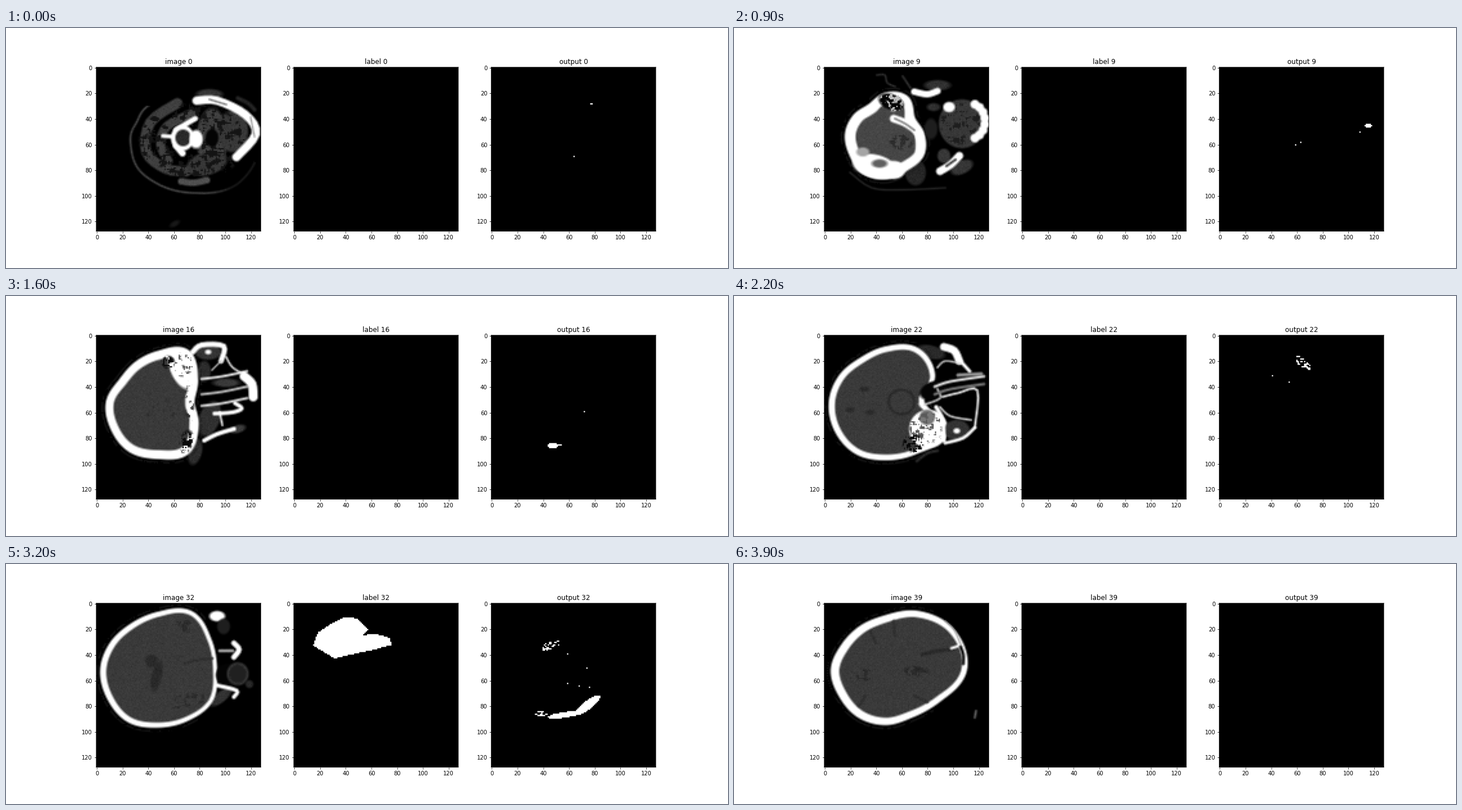
A matplotlib script that plays this animation: 1280x427 px, repeating every 4 s.

```python
import numpy as np
import matplotlib.pyplot as plt
from matplotlib.animation import FuncAnimation
from matplotlib.path import Path

SIZE, FRAMES, ZOOM = 128, 40, 4
BONE, BRAIN, SOFT, DARK, AIR = 255, 58, 64, 42, 4
X, Y = np.meshgrid(np.arange(SIZE) + 0.5, np.arange(SIZE) + 0.5)
CX, CY = 48, 52
RHO, ANGLE = np.hypot(X - CX, Y - CY), np.arctan2(Y - CY, X - CX)


def catmull(a, b, c, d, t):
    return (b + t * (c - a) / 2 + t**2 * (a - 2.5 * b + 2 * c - d / 2)
            + t**3 * (1.5 * (b - c) + (d - a) / 2))


def radius(radii, angle):
    """Smooth closed outline through radii at equal angles, clockwise from right."""
    r = np.asarray(radii, float)
    pos = angle / (2 * np.pi) * len(r)
    i = np.floor(pos).astype(int)
    return catmull(*(r[(i + k) % len(r)] for k in (-1, 0, 1, 2)), pos - i)


def outline(radii):
    """Signed distance to the outline, negative inside."""
    r = radius(radii, ANGLE)
    slope = (radius(radii, ANGLE + 0.02) - radius(radii, ANGLE - 0.02)) / 0.04
    return (RHO - r) / np.hypot(1, slope / r)


def ellipse(x, y, rx, ry, tilt=0):
    a = np.radians(tilt)
    u = (X - x) * np.cos(a) + (Y - y) * np.sin(a)
    v = (Y - y) * np.cos(a) - (X - x) * np.sin(a)
    return (np.hypot(u / rx, v / ry) - 1) * min(rx, ry)


def stroke(pts):
    """Distance to an open curve through flat x, y values."""
    p = np.reshape(pts, (-1, 2)).astype(float)
    q = np.vstack([p[:1], p, p[-1:]])
    t = np.linspace(0, 1, 5)[:, None]
    curve = np.vstack([catmull(*part, t) for part in zip(q, q[1:], q[2:], q[3:])])
    best = np.full((SIZE, SIZE), 1e9)
    for (ax, ay), (bx, by) in zip(curve, curve[1:]):
        dx, dy = bx - ax, by - ay
        s = np.clip(((X - ax) * dx + (Y - ay) * dy) / (dx * dx + dy * dy + 1e-9), 0, 1)
        best = np.minimum(best, np.hypot(X - ax - s * dx, Y - ay - s * dy))
    return best


def cover(d, soft=1.8):
    return np.clip(0.5 - d / soft, 0, 1)


def clumps(rng, w, h):
    """Blurred noise, ranked so that its values spread evenly over 0..1."""
    noise = rng.random((SIZE, SIZE))
    noise = sum(np.roll(noise, (j, i), (0, 1)) for i in range(w) for j in range(h))
    return noise.ravel().argsort().argsort().reshape(SIZE, SIZE) / SIZE**2


class Scan:
    def __init__(self, radii):
        self.img = np.zeros((SIZE, SIZE))
        self.rng = np.random.default_rng(int(radii[0]))
        self.radii = np.array(radii, float)
        self.edge = outline(radii)

    def paint(self, gray, alpha):
        self.img += (gray - self.img) * alpha

    def spot(self, gray, *shape):
        self.paint(gray, cover(ellipse(*shape)))

    def line(self, gray, width, *pts):
        self.paint(gray, cover(stroke(pts) - width / 2))

    def mottle(self, gray, share, size, *shape):
        patches = np.clip((share - clumps(self.rng, size, size)) * 4, 0, 1)
        self.paint(gray, cover(ellipse(*shape)) * patches)

    def skull(self, left, right, gray=BRAIN):
        halo = cover(abs(self.edge - 2.5) - 0.4) * (clumps(self.rng, 3, 3) < 0.6)
        self.paint(28, halo * (X < 85))
        self.paint(BONE, cover(self.edge))
        self.paint(gray, cover(self.edge + np.interp(X, [0, 100], [left, right])))

    def grain(self):
        tissue = (self.img > 35) & (self.img < 85)
        self.img = np.clip(self.img + tissue * self.rng.normal(0, 3, X.shape), 0, 255)
        return self


def neck():
    s = Scan([78, 74, 53, 39, 31, 24, 21, 19, 22, 26, 32, 56])
    s.paint(85, cover(abs(s.edge) - 0.6) * np.interp(X, [88, 105], [1, 0.35])
            * ((Y > 30) & (Y > X - 50)))
    s.line(SOFT, 8, 63, 28, 42, 43, 39, 66, 54, 79, 70, 81)
    s.line(SOFT, 7, 74, 36, 55, 46, 50, 60, 56, 73)
    s.spot(SOFT, 90, 56, 12, 24)
    s.spot(56, 106, 50, 12, 16)
    s.spot(56, 86, 75, 16, 9, -15)
    s.mottle(20, 0.4, 4, 75, 58, 42, 30)
    s.spot(AIR, 90, 55, 5, 7)
    s.line(80, 5, 66, 89, 76, 90, 86, 88)
    s.spot(52, 88, 21, 10, 4)
    s.line(36, 3, 110, 24, 118, 28, 123, 33)
    s.spot(BONE, 67, 55, 9, 10)
    s.line(BONE, 3, 52, 53.5, 60, 54)
    s.line(BONE, 4, 62, 49, 70, 44, 77, 40)
    s.line(BONE, 5, 62, 61, 67, 67)
    s.spot(DARK, 67.5, 55, 6, 6.5)
    s.spot(BONE, 77.5, 56, 5.2, 7)
    s.line(BONE, 6.5, 78, 26, 94, 26, 116, 37, 124, 52, 109, 70)
    s.line(90, 1, 88, 25, 101, 29)
    s.line(130, 0.8, 120, 39, 123, 54)
    s.spot(24, 61, 122, 4, 2, -30)
    return s


def skull_base():
    s = Scan([30, 34, 33, 35.5, 36, 33, 32, 29.5, 27, 32.5, 34, 26])
    s.line(45, 1, 20, 82, 37, 94, 61, 95.5, 94, 94)
    s.spot(38, 71, 82, 8, 10)
    s.skull(9, 7, 70)
    s.spot(BONE, 39, 77, 17, 9, 12)
    s.spot(BONE, 54, 80, 9, 7)
    s.mottle(46, 0.5, 4, 60, 58, 9, 6)
    s.spot(AIR, 52, 27, 10, 6, 20)
    s.mottle(190, 0.4, 2, 52, 27, 10, 7, 20)
    s.spot(165, 30, 66, 5, 3.5)
    s.spot(95, 43, 75, 6, 3.2)
    s.line(BONE, 6, 54, 40, 64, 44, 73, 52, 74, 66)
    s.line(100, 1.2, 55, 40, 63, 44, 70, 49)
    s.line(60, 1, 41, 6, 47, 6, 49, 12, 55, 15)
    s.line(60, 1.2, 61, 7, 67, 16)
    s.spot(50, 88, 14, 10, 4)
    s.line(BONE, 5, 70, 19, 80, 21, 88, 18.5)
    s.spot(48, 85, 31, 5, 3)
    s.spot(30, 83, 48, 5, 8)
    s.spot(56, 107, 44, 18, 19)
    s.mottle(30, 0.4, 4, 106, 44, 16, 16)
    s.spot(BONE, 97, 31, 4.5, 4)
    for turn in np.radians(np.arange(-70, 75, 20)):
        s.spot(BONE, 113 + 12 * np.cos(turn), 42 + 14 * np.sin(turn), 3.4, 3.4)
    s.spot(55, 93, 69, 5, 5.5)
    s.spot(54, 107, 78, 9, 5, -25)
    s.line(BONE, 6, 90, 81, 98, 76, 105, 69)
    s.line(40, 1.6, 95, 77, 102, 72)
    return s


def orbits():
    s = Scan([28.5, 36.5, 47, 44.5, 45, 42.5, 40.5, 35, 36, 40, 47, 36])
    s.spot(46, 77, 91, 5, 10, 15)
    s.spot(44, 84, 28, 5, 8)
    s.spot(48, 88, 65, 8, 14, 20)
    s.skull(6, 8)
    s.spot(BONE, 66, 27, 8, 16, -25)
    s.mottle(DARK, 0.2, 4, 50, 57, 14, 9)
    s.mottle(10, 0.6, 3, 56, 21, 5, 5)
    s.mottle(70, 0.3, 3, 67, 23, 8, 9)
    s.mottle(50, 0.3, 3, 72, 54, 4, 16)
    s.mottle(8, 0.7, 3, 70, 83, 5, 9, 15)
    s.spot(52, 87, 13, 10, 6)
    s.line(BONE, 4, 75, 13, 82, 7.5, 99, 8.5, 97, 20)
    s.spot(BONE, 87, 13, 2.3, 1.8)
    s.line(200, 1, 97, 20, 90, 27)
    s.line(BONE, 1.2, 101, 17, 106, 25, 116, 31)
    for y, gray in [(34, 240), (46, 200), (55, 230)]:
        s.line(gray, 1.8, 82, y, 98, y - 2, 117, y - 6)
    s.spot(58, 101, 37, 10, 3.2)
    s.line(BONE, 7, 115, 32, 121, 38, 122, 48)
    s.line(BONE, 3, 92, 61, 106, 60, 113, 57, 108, 53)
    s.spot(60, 110, 73, 6, 3, -15)
    s.line(BONE, 3.2, 84, 82, 94, 77, 107, 73)
    s.line(BONE, 1.4, 96, 60, 98, 70)
    return s


def sinuses():
    s = Scan([30, 51, 47, 45.5, 47, 46, 44.5, 42, 40, 43.5, 49, 44])
    s.line(44, 2, 72, 98, 80, 92, 88, 90)
    s.spot(42, 83, 13, 11, 5, 15)
    s.skull(5, 4)
    s.spot(BONE, 81, 73, 15, 15)
    s.paint(DARK, cover(abs(ellipse(60, 52, 10, 9.5)) - 1))
    for x, y in [(20, 58), (36, 60), (31, 42)]:
        s.spot(DARK, x, y, 3.5, 2)
    s.spot(AIR, 85, 43, 11, 7, -20)
    s.line(210, 1.4, 78, 54, 90, 49, 88, 42)
    s.spot(120, 80, 64, 6, 6)
    s.mottle(90, 0.35, 3, 80, 72, 14, 12)
    s.mottle(8, 0.5, 3, 69, 85, 8, 8)
    s.line(BONE, 6, 93, 9, 101, 12, 105, 20)
    s.line(BONE, 2.5, 105, 19, 113, 28)
    s.line(220, 1.2, 88, 25, 94, 20, 106, 22)
    s.line(150, 2.5, 104, 31, 122, 30)
    for y, gray in [(37, 230), (43, 120)]:
        s.line(gray, 2, 86, y + 3, 98, y - 1, 124, y - 5)
    s.line(BONE, 1.5, 92, 48, 104, 45, 119, 43, 117, 72)
    s.line(230, 1.3, 90, 56, 98, 63, 114, 66)
    s.spot(50, 103, 74, 10, 8)
    s.spot(BONE, 103, 74.5, 2.5, 2)
    s.line(BONE, 2.4, 117, 72, 108, 80, 94, 84)
    s.line(BONE, 3, 93, 82, 92, 66, 87, 56)
    return s


def ethmoid():
    s = Scan([33, 51, 47, 46, 48, 47, 45, 42, 41, 45.5, 50, 36])
    s.line(44, 2, 72, 98, 80, 93, 88, 89)
    s.spot(44, 82, 11, 10, 4)
    s.spot(28, 101, 17, 9, 8)
    s.spot(42, 99, 73, 11, 6, -35)
    s.skull(5, 2.6)
    s.mottle(DARK, 0.5, 4, 60, 22, 13, 4, -15)
    s.mottle(DARK, 0.35, 5, 55, 48, 25, 12)
    s.spot(44, 45, 74, 8, 3)
    s.line(BONE, 3.5, 78, 38, 85, 24, 92, 12, 94, 6)
    s.spot(AIR, 101, 46, 20, 16)
    s.mottle(150, 0.35, 2, 100, 45, 19, 15)
    for x, y in [(94, 48), (102, 55), (109, 50), (113, 62), (86, 48)]:
        s.spot(0, x, y, 3, 3)
    s.line(230, 2.2, 110, 25, 113, 30, 122, 32)
    s.line(110, 2, 112, 40, 123, 34)
    s.line(BONE, 2.4, 120, 42, 118, 64, 101, 82)
    s.line(BONE, 2.2, 98, 60, 116, 69)
    return s


def ventricles():
    s = Scan([46, 49, 46, 45, 47, 45.5, 45, 43, 42, 45.5, 53, 48])
    s.spot(50, 97, 73, 10, 4, -40)
    s.skull(5, 3)
    s.spot(DARK, 43, 45, 5, 5)
    s.spot(DARK, 47, 57, 4, 12, 12)
    s.mottle(44, 0.4, 4, 68, 17, 6, 7)
    s.mottle(44, 0.4, 4, 70, 76, 18, 5, -10)
    s.line(46, 2, 68, 47, 80, 44, 90, 43)
    s.spot(BONE, 94, 10, 6, 4)
    s.spot(30, 99, 18, 5, 6)
    s.line(BONE, 4, 107, 31, 111, 36, 107, 42)
    s.line(190, 2, 96, 37, 106, 37)
    s.spot(AIR, 102, 56, 9, 9)
    s.spot(52, 110, 55, 8.5, 9)
    s.spot(32, 110, 55, 6.5, 7)
    s.spot(40, 119, 63, 3, 3)
    s.line(BONE, 3, 94, 64, 109, 68, 107, 73)
    return s


def vault():
    s = Scan([63, 49, 42.5, 43, 43, 42, 43, 40, 40, 43, 53, 62])
    s.skull(7, 4.5)
    s.line(DARK, 3, 76, 40, 88, 37, 100, 36)
    for x, y, dx, dy in [(54, 14, 1, 11), (36, 22, 4, 9), (32, 72, -5, 8), (70, 72, 10, 5)]:
        s.line(46, 2, x, y, x + dx, y + dy)
    s.mottle(DARK, 0.7, 4, 71, 53, 10, 4)
    s.mottle(DARK, 0.5, 4, 31, 56, 6, 5)
    s.line(150, 0.8, 94, 14, 101, 21, 106, 32)
    s.line(BONE, 2, 99, 35, 105, 33)
    s.line(AIR, 2.2, 106, 34, 108, 40, 108, 47)
    s.line(100, 1.6, 118, 84, 117, 89)
    return s


SCANS = {0: neck(), 9: skull_base(), 16: orbits(), 22: sinuses(), 26: ethmoid(),
         32: ventricles(), 39: vault()}
for scan in SCANS.values():
    scan.grain()

# Detections as ellipses: share of lit cells, x, y, rx, ry, tilt.
HITS = {
    0: [(1, 78, 28.5, 1.2, 0.6), (1, 64.5, 69.5, 0.6, 0.6)],
    9: [(1, 116, 45.5, 3, 1.8), (1, 109.5, 50.5, 0.6, 0.6), (1, 59.5, 60.5, 0.6, 0.6),
        (1, 63.5, 58.5, 0.6, 0.6)],
    16: [(1, 48, 86, 3.6, 2.4), (1, 52, 85.5, 3, 0.6), (1, 72.5, 59.5, 0.6, 0.6)],
    22: [(0.45, 65, 21.5, 8, 3.2, 40), (0.006, 46, 44, 11, 14)],
    26: [(0.55, 64, 18, 11, 3.5, 5), (0.35, 49, 25, 8, 4, -30), (0.35, 42, 40, 10, 3, 55),
         (0.35, 77, 82, 6, 2, -45), (1, 58.5, 12.5, 4.5, 0.6), (1, 45, 87.5, 2.5, 0.6),
         (1, 51, 71, 1.5, 1), (1, 82, 70.5, 1, 1.5), (0.006, 50, 65, 28, 22)],
    32: [(1, 57, 87, 13, 2.2, -8), (1, 75, 79.5, 12, 3.4, -38), (0.45, 46, 33, 8, 3, -20),
         (0.3, 39, 86, 5, 2), (0.004, 68, 55, 22, 20)],
    39: [],
}


def shares(hits):
    out = np.zeros((SIZE, SIZE))
    for share, *shape in hits:
        out = np.maximum(out, share * (ellipse(*shape) < 0))
    return out


SHARES = {key: shares(hits) for key, hits in HITS.items()}
KEYS = list(SCANS)


def span(n):
    i = min(np.searchsorted(KEYS, n, side="right") - 1, len(KEYS) - 2)
    a, b = KEYS[i:i + 2]
    return a, b, (n - a) / (b - a)


def warp(scan, r):
    ratio = radius(scan.radii, ANGLE) / r
    sx = np.floor(CX + (X - CX) * ratio).astype(int)
    sy = np.floor(CY + (Y - CY) * ratio).astype(int)
    ok = (sx >= 0) & (sx < SIZE) & (sy >= 0) & (sy < SIZE)
    return scan.img[sy.clip(0, SIZE - 1), sx.clip(0, SIZE - 1)] * ok


def image(n):
    """Bend both neighbouring slices to a shared outline and mix them."""
    a, b, u = span(n)
    a, b = SCANS[a], SCANS[b]
    r = radius(a.radii * (1 - u) + b.radii * u, ANGLE)
    mix = u * u * (3 - 2 * u)
    return warp(a, r) * (1 - mix) + warp(b, r) * mix


LESION = np.reshape([15, 33, 32, 43, 42, 40.5, 61, 36.5, 76, 32.5, 75, 27, 63, 23.5,
                     54, 25, 58, 20, 50, 12, 40, 10.5, 29, 16, 19, 22.5], (-1, 2))


def label(n):
    scale = np.sqrt(max(0, 1 - ((n - 32) / 5.5)**2))
    centre = LESION.mean(axis=0)
    path = Path(centre + scale * (LESION - centre))
    cells = np.column_stack([X.ravel(), Y.ravel()])
    return 255 * path.contains_points(cells).reshape(SIZE, SIZE)


def output(n):
    a, b, u = span(n)
    share = np.maximum(SHARES[a] * (1 - u), SHARES[b] * u)
    return 255 * (clumps(np.random.default_rng(n + 50), 2, 1) < share)


PANELS = {"image": image, "label": label, "output": output}
slides = [[draw(n) for draw in PANELS.values()] for n in range(FRAMES)]

K = 10 / 9
plt.rcParams.update({"font.family": "DejaVu Sans", "font.size": 10 * K, "path.snap": False,
                     "axes.linewidth": 0.8 * K, "axes.titlepad": 6 * K})
for side in ("xtick", "ytick"):
    plt.rcParams.update({f"{side}.major.size": 3.5 * K, f"{side}.major.pad": 3.5 * K,
                         f"{side}.major.width": 0.8 * K})

fig, axes = plt.subplots(1, 3, figsize=(1280 / 64, 427 / 64), dpi=64)
views = []
for ax in axes:
    views.append(ax.imshow(np.zeros((SIZE * ZOOM, SIZE * ZOOM)), cmap="gray", vmin=0,
                           vmax=255, extent=(-0.5, SIZE - 0.5, SIZE - 0.5, -0.5)))
    ax.set_xticks(range(0, SIZE, 20))
    ax.set_yticks(range(0, SIZE, 20))


def update(n):
    for ax, view, name, data in zip(axes, views, PANELS, slides[n]):
        view.set_data(data.repeat(ZOOM, 0).repeat(ZOOM, 1))
        ax.set_title(f"{name} {n}")
    return views


anim = FuncAnimation(fig, update, frames=FRAMES, interval=100, repeat=True)
plt.show()
```
